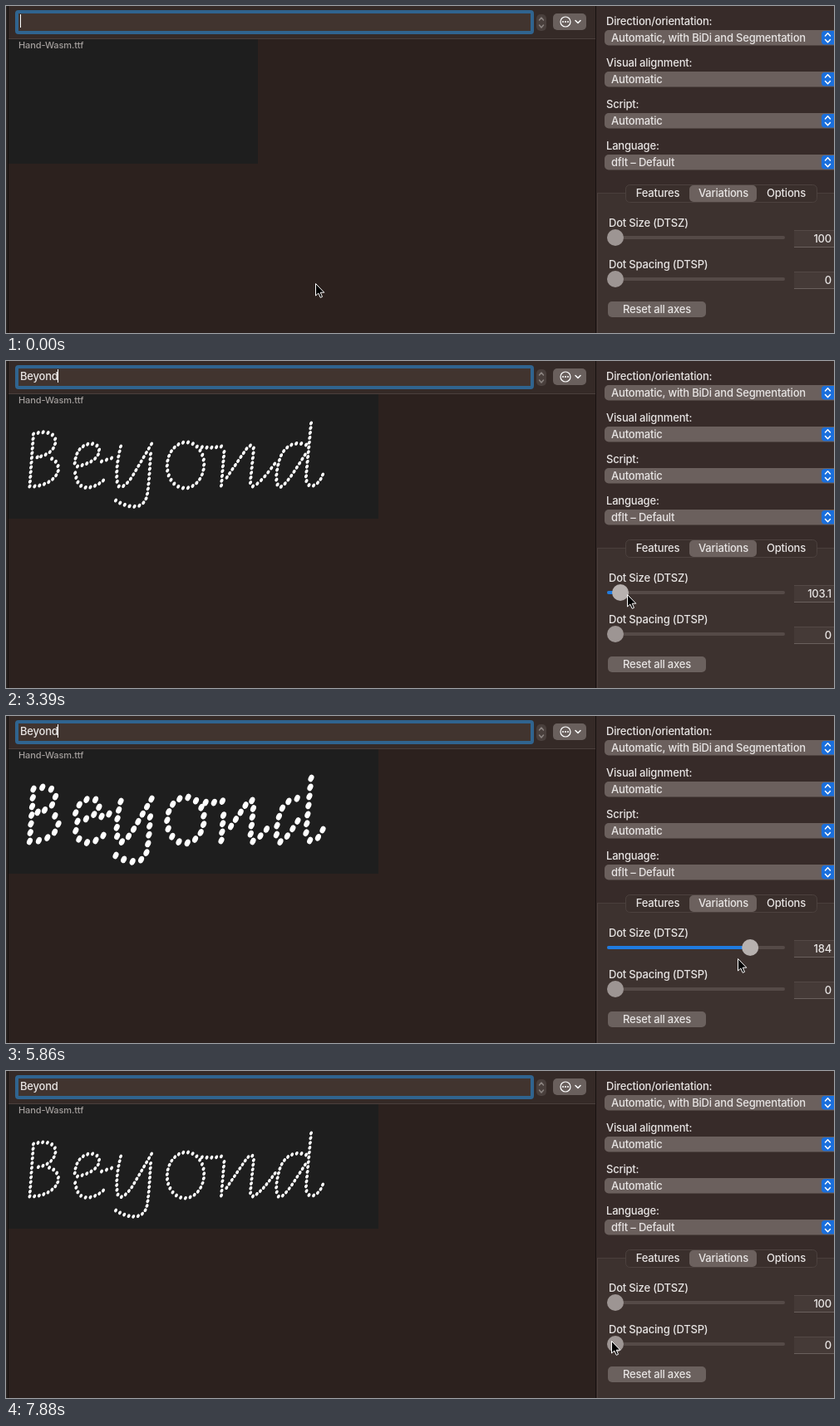
Animation of 996x394 px, one loop 8 s. Source, as an HTML page:

```html
<!DOCTYPE html>
<html lang="en">
<head>
<meta charset="utf-8">
<title>Dotted handwriting variations</title>
<style>
  html, body { margin: 0; width: 100%; height: 100%; overflow: hidden; background: #2c211e; }
  svg { display: block; width: 996px; height: 394px; }
  text { font: 500 13px Inter, "Open Sans", sans-serif; letter-spacing: -.2px; fill: #e8e5e4; white-space: pre; }
  .small { font-size: 11px; letter-spacing: -.1px; fill: #a39e9c; }
  .line { fill: none; stroke: #fff; stroke-width: 1.5; stroke-linecap: round; stroke-linejoin: round; }
  .mid { text-anchor: middle; }
  .end { text-anchor: end; }
</style>
</head>
<body>
<svg id="stage" viewBox="0 0 996 394" xmlns="http://www.w3.org/2000/svg"></svg>
<script>
const LOOP = 8000;
const stage = document.getElementById('stage');
const byId = id => document.getElementById(id);

// ---------- Static interface ----------
const rect = (x, y, w, h, fill, extra = '') =>
  `<rect x="${x}" y="${y}" width="${w}" height="${h}" fill="${fill}" ${extra}/>`;
const text = (x, y, s, cls = '', id = '') => `<text x="${x}" y="${y}" class="${cls}" id="${id}">${s}</text>`;
const line = (d, extra = '') => `<path class="line" d="${d}" ${extra}/>`;

const popup = (y, label, value) =>
  text(722, y - 15, label) +
  rect(720, y - 9, 290, 18.5, '#6b605d', 'rx="5"') +
  text(728, y + 4.5, value) +
  rect(981, y - 8, 24, 16.5, '#1a6fdc', 'rx="4"') +
  line(`M985.5 ${y - 2}l3-3.2 3 3.2M985.5 ${y + 2.5}l3 3.2 3-3.2`);

const slider = (y, label, name) =>
  text(725, y - 13, label) +
  rect(723, y - 2, 214, 4, '#554a47', 'rx="2"') +
  rect(723, y - 2, 0, 4, '#1f7be0', `rx="2" id="${name}Fill"`) +
  `<circle cx="733" cy="${y}" r="10" fill="#9d9593" id="${name}Thumb"/>` +
  rect(948, y - 9, 60, 21, '#453a37') +
  rect(948, y - 9, 60, 1, '#544946') + rect(948, y + 11, 60, 1, '#6a605d') +
  text(993, y + 6, '0', 'end', name + 'Value');

stage.innerHTML =
  rect(0, 0, 996, 394, '#2c211e') +
  rect(3, 0, 706, 39, '#352a27') + rect(3, 39, 706, 1, '#4a3f3c') +
  rect(3, 40, 300, 150, '#1e1e1e', 'id="preview"') +
  rect(0, 0, 2, 394, '#2b2523') + rect(2, 0, 1, 394, '#120e0d') +
  text(15, 51, 'Hand-Wasm.ttf', 'small') +
  '<path id="dots" fill="#fff"/>' +
  // Search field and its buttons
  rect(13, 7, 620, 25, '#41342f', 'rx="2" stroke="#30648f" stroke-width="4"') +
  text(17, 23, '', '', 'typed') +
  rect(17, 10, 1, 16, '#fff', 'id="caret"') +
  rect(638, 10, 12, 20, '#493f3c', 'rx="5"') +
  line('M641.5 17l2.5-3 2.5 3M641.5 23l2.5 3 2.5-3', 'style="stroke:#8b8380"') +
  rect(658, 9, 40, 20, '#6a605d', 'rx="5"') +
  '<circle class="line" cx="673" cy="19" r="6" style="stroke-width:1.2"/>' +
  [670, 673, 676].map(x => `<circle cx="${x}" cy="19" r="1" fill="#fff"/>`).join('') +
  line('M685 17.5l3 3 3-3') +
  // Side panel
  rect(709, 0, 287, 394, '#372b29') + rect(709, 0, 1, 394, '#171110') +
  popup(38, 'Direction/orientation:', 'Automatic, with BiDi and Segmentation') +
  popup(88, 'Visual alignment:', 'Automatic') +
  popup(138, 'Script:', 'Automatic') +
  popup(188, 'Language:', 'dflt – Default') +
  rect(711.5, 225.5, 300, 190, '#3d322f', 'stroke="#4a3f3c"') +
  rect(745.5, 215.5, 230, 21, '#3a2f2c', 'rx="5" stroke="#4c413e"') +
  rect(822, 216, 81, 20, '#6c615e', 'rx="5"') +
  text(784, 230, 'Features', 'mid') + text(863, 230, 'Variations', 'mid') + text(938.5, 230, 'Options', 'mid') +
  slider(279, 'Dot Size (DTSZ)', 'size') +
  slider(329, 'Dot Spacing (DTSP)', 'space') +
  rect(724, 356, 118, 19, '#6b615e', 'rx="5"') +
  text(783, 369.5, 'Reset all axes', 'mid') +
  '<path id="pointer" d="M.5 .5V15L3.8 12 6.2 17.3 8.5 16.3 6.2 11.2H10.8Z" fill="#000" stroke="#fff" stroke-linejoin="round"/>';

// ---------- Dotted lettering ----------
const WORD = 'Beyond';
const LETTERS = {
  B: ['M33 88L28.5 151', 'M33 88C47 83 60 87 59.5 97S50 114 37 116C53 113 63 120 63 130S48 152 28.5 151'],
  e: ['M86 127C101 124 113 116 112 107S97 97 89 106S81 133 86 145S107 153 117 144'],
  y: ['M138 103C134 118 132 136 134 147S146 148 152 139L175 100',
    'M175 100C173 120 173 140 170 160S148 178 132 168', 'M115 121L133 115'],
  o: ['M219 98A22 27.5 5 0 0 213 153A22 27.5 5 0 0 219 98'],
  n: ['M230 103Q247 106 263 102L259 150', 'M259 150L287 109Q296 96 298 106L294 145Q294 151 297 151'],
  d: ['M367 75L361 138C360 157 376 152 381 137',
    'M361 101C345 95 333 105 329 119S324 143 327 150S341 142 348 131L363 108', 'M297 151C308 146 318 130 327 119']
};
const strokes = [...WORD].map(letter => LETTERS[letter].map(d => {
  const path = document.createElementNS('http://www.w3.org/2000/svg', 'path');
  path.setAttribute('d', d);
  return { path, length: path.getTotalLength() };
}));

const TILT = 25;
function ellipse({ x, y }, scale) {
  const rx = 1.75 * scale, ry = 2.45 * scale, a = TILT * Math.PI / 180;
  const dx = ry * Math.sin(a), dy = -ry * Math.cos(a);
  const arc = s => `a${rx} ${ry} ${TILT} 0 1 ${s * dx} ${s * dy}`;
  return `M${x + dx} ${y + dy}${arc(-2)}${arc(2)}z`;
}

// Dots sit evenly along each stroke; one that would crowd another is dropped.
function dottedWord(count, scale) {
  const gap = 5.8 * scale, dots = [];
  for (const { path, length } of strokes.slice(0, count).flat()) {
    const n = Math.max(1, Math.round(length / gap));
    for (let i = 0; i <= n; i++) {
      const p = path.getPointAtLength(length * i / n);
      if (dots.every(q => Math.hypot(p.x - q.x, p.y - q.y) > gap * .7)) dots.push(p);
    }
  }
  return dots.map(p => ellipse(p, scale)).join('');
}

// ---------- Motion ----------
const TICK = 87.8;
const PRESS = 2950, RELEASE = 7090;
const TRACK = { min: 733, max: 926 };
const clamp = (v, lo, hi) => Math.min(hi, Math.max(lo, v));
const mix = (a, b, p) => a + (b - a) * p;

// Pointer moves: a curve to a new place, bent towards `via`; `soft` blends linear into smoothstep.
const MOVES = [
  { start: 1250, end: 1790, via: [500, 418], to: [718, 291], soft: .5 },
  { start: 2230, end: 2680, to: [733, 280], soft: 1 },
  { start: 3220, end: 4980, to: [944, 288], soft: .5 },
  { start: 5240, end: 7000, to: [718, 301], soft: 1 },
  { start: 7260, end: 7880, via: [770, 365], to: [728, 325], soft: 0 }
];

function pointerAt(time) {
  let pos = [372, 334];
  for (const { start, end, via, to, soft } of MOVES) {
    if (time < start) break;
    const ticks = Math.round((end - start) / TICK);
    const p = Math.min(1, Math.floor((time - start + 8) / TICK) / ticks);
    const q = mix(p, p * p * (3 - 2 * p), soft);
    pos = pos.map((from, i) => via
      ? mix(mix(from, via[i], q), mix(via[i], to[i], q), q)
      : mix(from, to[i], q));
  }
  return pos;
}

// The dragged thumb trails the pointer by one tick.
function thumbAt(time) {
  const dragging = time >= PRESS && time < RELEASE;
  return dragging ? clamp(pointerAt(time - TICK)[0], TRACK.min, TRACK.max) : TRACK.min;
}

// Two quick bursts of three keys.
const typedAt = time => clamp(Math.floor((time - 260) / 90), 0, 3) + clamp(Math.floor((time - 710) / 90), 0, 3);

function caretAt(time) {
  if (time < 350) return time < 170;
  if (time < PRESS) return Math.floor(Math.max(0, time - 980) / 490) % 2 === 0;
  return time < RELEASE || Math.floor((time - RELEASE) / 395) % 2 === 1;
}

function set(id, attrs) {
  for (const name in attrs) byId(id).setAttribute(name, attrs[name]);
}

let shown = '';
function render(time) {
  const count = typedAt(time);
  const thumbX = thumbAt(time);
  const size = Math.round(1000 + 1000 * (thumbX - TRACK.min) / (TRACK.max - TRACK.min)) / 10;
  const key = count + '/' + size;

  if (key !== shown) {
    shown = key;
    byId('typed').textContent = WORD.slice(0, count);
    byId('sizeValue').textContent = size;
    set('preview', { width: Math.max(300, 10 + 72.5 * count) });
    set('dots', { d: dottedWord(count, size / 100) });
    set('sizeThumb', { cx: thumbX });
    set('sizeFill', { width: size > 100 ? thumbX - 723 : 0 });
  }
  const textEnd = count ? 16 + byId('typed').getComputedTextLength() : 17;
  const [x, y] = pointerAt(time).map(Math.round);
  set('caret', { x: Math.round(textEnd), opacity: caretAt(time) ? 1 : 0 });
  set('sizeThumb', { fill: time >= PRESS && time < RELEASE ? '#b7b1af' : '#9d9593' });
  set('pointer', { transform: `translate(${x} ${y})` });
}

const start = performance.now();
function tick() {
  render((performance.now() - start) % LOOP);
  requestAnimationFrame(tick);
}
tick();
</script>
</body>
</html>
```
